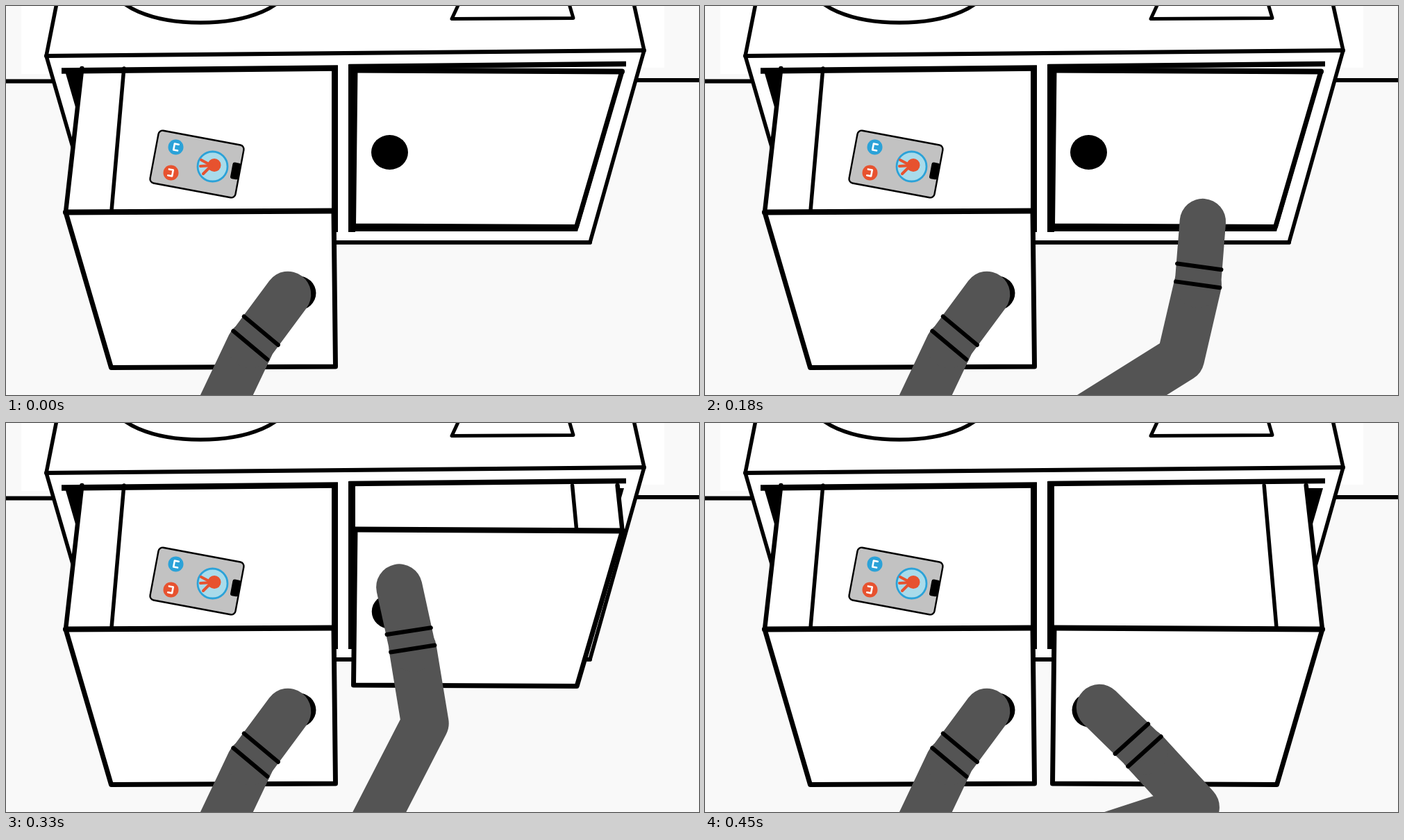
Animation of 998 by 561 pixels, one loop 1.2 s. Source, as an HTML page with a canvas:

```html
<!DOCTYPE html>
<html lang="en">
<head>
<meta charset="utf-8">
<title>Drawers</title>
<style>
html, body { margin: 0; width: 100%; height: 100%; overflow: hidden; background: #f9f9f9; }
canvas { display: block; }
</style>
</head>
<body>
<canvas id="stage" width="998" height="561"></canvas>
<script>
const ctx = document.getElementById('stage').getContext('2d');
const LOOP = 1200, STEP = 30, REACH = 120, GRIP = 270, END = 450;
const OPEN = 203, MIRROR = 975;
const SHOULDER = { x: 508, y: 619 };
const UPPER = 209, FORE = 109, HAND = 91;
const TILT = 10.6 * Math.PI / 180;
const BLUE = '#2ba2d8', RED = '#e7522f';

function trace(pts, closed) {
  ctx.beginPath();
  for (let i = 0; i < pts.length; i += 2) ctx.lineTo(pts[i], pts[i + 1]);
  if (closed) ctx.closePath();
}

function stroke(width, color = '#000') {
  ctx.lineWidth = width;
  ctx.strokeStyle = color;
  ctx.stroke();
}

function line(width, ...pts) {
  trace(pts);
  stroke(width);
}

function fill(color, ...pts) {
  trace(pts, true);
  ctx.fillStyle = color;
  ctx.fill();
}

function disc(x, y, rx, ry, color) {
  ctx.beginPath();
  ctx.ellipse(x, y, rx, ry, 0, 0, 7);
  ctx.fillStyle = color;
  ctx.fill();
}

function box(x, y, w, h, r, color) {
  ctx.beginPath();
  ctx.roundRect(x, y, w, h, r);
  ctx.fillStyle = color;
  ctx.fill();
}

function room() {
  box(0, 0, 998, 561, 0, '#f9f9f9');
  box(22, 0, 465, 98, 0, '#fff');
  box(487, 0, 461, 89, 0, '#fff');
  line(6, 0, 108.5, 70, 108.5);
  line(6, 906, 107, 998, 107);

  fill('#fff', 73, 0, 58, 72, 136, 341, 841, 341, 919, 64, 905, 0);
  line(5.5, 73, -4, 58, 72, 136, 341);
  line(5.5, 904, -4, 919, 64, 841, 341);
  line(6, 58, 72, 919, 64);
  line(6, 136, 341, 841, 341);

  ctx.beginPath();
  ctx.ellipse(280, -30, 126, 54, 0, 0, Math.PI);
  stroke(5.5);
  line(5, 652, -3, 642, 18.5, 817, 17.5, 811, -3);
}

// The right drawer, pulled out by off pixels
function drawer(off) {
  const top = 92.5 + off, wide = off / 100;
  const right = 887 + wide, foot = 821 + wide;
  const outer = 887 - off * 0.105, inner = 820 - off * 0.073;
  fill('#000', 499, 92, 890, 94, 823, 325, 499, 325);
  if (off > 0) {
    fill('#fff', 503, 88, outer, 88, right, top + 2, 503, top);
    line(6.5, outer, 90, right, top + 2);
    line(5.5, inner, 90, foot, top);
  }
  fill('#fff', 503, top, right, top + 2, foot, top + 225, 501, top + 225);
  line(8, 503, top, right, top + 2);
  line(7, right, top + 2, foot + 0.5, top + 226, 500.5, top + 224.5, 503, top);
  disc(552.5 + off / 80, 211 + off, 26.5, 25, '#000');
}

function drawers(off) {
  drawer(off);
  ctx.save();
  ctx.translate(MIRROR, 0);
  ctx.scale(-1, 1);
  drawer(OPEN);
  ctx.restore();

  ctx.lineCap = 'butt';
  line(10, 498, 84, 498, 326);
  line(9, 473.5, 86, 473.5, 326);
  line(7.5, 494, 87.5, 893, 83.5);
  line(8.5, 80, 93.5, 478, 89.5);
  ctx.lineCap = 'round';
}

function badge(x, y, color, dir) {
  disc(x, y, 11, 11, color);
  ctx.save();
  ctx.translate(x, y);
  ctx.rotate(TILT);
  ctx.scale(dir, 1);
  trace([3.5, -4.5, -2.5, -4.5, -2.5, 4.5, 3.5, 4.5]);
  stroke(2.6, '#fff');
  ctx.restore();
}

function phone() {
  ctx.save();
  ctx.translate(275, 228);
  ctx.rotate(TILT);
  box(-62.5, -38.5, 125, 77, 6, '#c2c2c2');
  stroke(2.4);
  box(50.5, -12.5, 12, 24, 3, '#000');
  ctx.restore();

  disc(297.5, 231.5, 21.5, 21.5, '#a9dbea');
  stroke(2.8, BLUE);
  disc(300, 229.5, 9.5, 9.5, RED);
  ctx.lineCap = 'round';
  for (const [x, y] of [[281, 222], [280, 231], [284, 242]]) {
    trace([296, 230, x, y]);
    stroke(4, RED);
  }
  badge(244.5, 203.5, BLUE, 1);
  badge(237.5, 240.5, RED, -1);
}

function limb(hand, wrist, ...rest) {
  trace([wrist, ...rest].flatMap(p => [p.x, p.y]));
  stroke(68.5, '#545454');
  trace([hand.x, hand.y, wrist.x, wrist.y]);
  stroke(66.5, '#545454');

  const angle = Math.atan2(hand.x - wrist.x, wrist.y - hand.y);
  const c = Math.cos(angle + 0.06) * 32, s = Math.sin(angle + 0.06) * 32;
  for (const d of [65, 91]) {
    const p = along(hand, angle, d);
    line(6, p.x - c, p.y - s, p.x + c, p.y + s);
  }
}

// Angles run clockwise from straight down
function along(p, angle, length) {
  return { x: p.x - Math.sin(angle) * length, y: p.y + Math.cos(angle) * length };
}

function handAt(t) {
  if (t < GRIP) {
    const u = (t - REACH) / (GRIP - REACH);
    return {
      x: 763 - 191 * Math.max(0, u) ** 1.55,
      y: 220 + 191 * (1 - u) ** 1.45
    };
  }
  const u = (t - GRIP) / (END - GRIP), v = u ** 1.55;
  return {
    x: 572 - 4 * u - 5 * Math.sin(2 * Math.PI * u),
    y: 220 + 190 * v * v * (3 - 2 * v)
  };
}

// Two-bone reach from a fixed shoulder, with a slight bend at the wrist
function reachingArm(hand) {
  const bend = (3 + (hand.x - 567) * 0.037) * Math.PI / 180;
  const lower = Math.sqrt(FORE ** 2 + HAND ** 2 + 2 * FORE * HAND * Math.cos(bend));
  const dx = hand.x - SHOULDER.x, dy = SHOULDER.y - hand.y;
  const dist = Math.hypot(dx, dy);
  const cos = (UPPER ** 2 + dist ** 2 - lower ** 2) / (2 * UPPER * dist);
  const lift = Math.atan2(dx, dy) + Math.acos(Math.min(1, cos));
  const elbow = along(SHOULDER, lift, -UPPER);
  const chord = Math.atan2(hand.x - elbow.x, elbow.y - hand.y);
  const wrist = along(hand, chord - bend * FORE / (FORE + HAND), HAND);
  limb(hand, wrist, elbow, SHOULDER);
}

function pull(t) {
  const u = Math.max(0, (t - GRIP) / (END - GRIP));
  return OPEN * (0.6 * u + 0.2 * (1 - Math.cos(Math.PI * u)));
}

function draw(now) {
  const t = Math.min(END, Math.floor((now % LOOP) / STEP) * STEP);
  ctx.lineCap = ctx.lineJoin = 'round';
  room();
  drawers(pull(t));
  phone();
  limb({ x: 406, y: 416 }, { x: 352, y: 489 }, { x: 306, y: 586 });
  reachingArm(handAt(t));
}

const start = performance.now();
function tick() {
  draw(performance.now() - start);
  requestAnimationFrame(tick);
}
tick();
</script>
</body>
</html>
```
